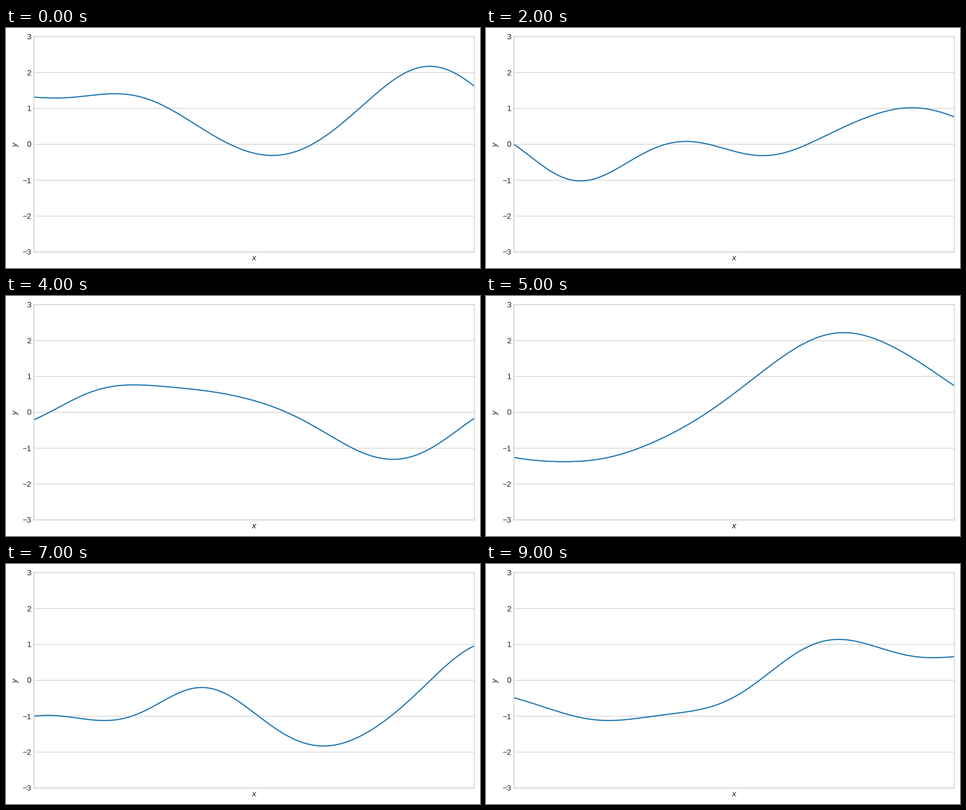
A matplotlib script for the animation above (10000 ms loop, 1053 by 532 pixels).

```python
import numpy as np
import matplotlib.pyplot as plt
from matplotlib.animation import FuncAnimation

WIDTH, HEIGHT, DPI = 1053, 532, 125
LEFT, RIGHT, TOP, BOTTOM = 62, 1040.5, 19.2, 496.5
SPAN = 8  # x range measured in kernel length scales
JITTER = 2e-5


def gaussian(a, b):
    """Return pairwise differences and the exponentiated quadratic kernel."""
    diff = a[:, None] - b[None, :]
    return diff, np.exp(-0.5 * diff ** 2)


def smooth_function(start, end, turns, through=()):
    """Gaussian process mean with flat slope at turns, passing through points."""
    points = np.array([(0, start), *through, *turns, (SPAN, end)])
    px, py = points.T
    flat = np.array([x for x, _ in turns])

    _, k_pp = gaussian(px, px)
    d_pf, k_pf = gaussian(px, flat)
    d_ff, k_ff = gaussian(flat, flat)
    cross = d_pf * k_pf
    cov = np.block([[k_pp, cross], [cross.T, (1 - d_ff ** 2) * k_ff]])
    known = np.concatenate([py, np.zeros(len(flat))])
    weights = np.linalg.solve(cov + JITTER * np.eye(len(known)), known)

    def mean(x):
        _, k_xp = gaussian(x, px)
        d_xf, k_xf = gaussian(x, flat)
        return np.hstack([k_xp, d_xf * k_xf]) @ weights

    return mean


FUNCTIONS = [
    smooth_function(1.315, 1.62, [(.39, 1.29), (1.47, 1.41), (4.33, -.31), (7.19, 2.175)],
                    [(2.45, 1), (3.56, 0), (5.91, 1)]),
    smooth_function(-1.545, 1, [(2.845, 2.35), (5.5, -.07), (7.73, 1.025)],
                    [(.79, 0), (1.31, 1), (4.27, 1)]),
    smooth_function(0, .765, [(1.21, -1.02), (3.13, .08), (4.52, -.315), (7.23, 1.02)],
                    [(5.33, 0)]),
    smooth_function(.6, .2, [(1.2, 1.235), (5.2, -1.28)], [(3.2, 0)]),
    smooth_function(-.205, -.165, [(1.82, .765), (6.52, -1.31)],
                    [(.28, 0), (3.09, .605), (4.59, 0), (5.79, -1), (7.21, -1)]),
    smooth_function(-1.255, .74, [(.92, -1.375), (5.99, 2.22)],
                    [(2.27, -1), (3.52, 0), (4.4, 1), (7.75, 1)]),
    smooth_function(.4, .6, [(1, .75), (4.3, -.6)]),
    smooth_function(-1, .96, [(.25, -.975), (1.28, -1.12), (3.05, -.2), (5.26, -1.83)],
                    [(4.08, -1), (6.48, -1), (7.2, 0)]),
    smooth_function(-.3, -.2, [(3, 1.06), (6.3, -.4)]),
    smooth_function(-.485, .66, [(1.725, -1.12), (5.9, 1.14), (7.61, .63)],
                    [(2.53, -1), (3.58, -.735), (4.46, 0)]),
]

plt.rcParams.update({
    "font.family": "Liberation Sans",
    "font.size": 10,
    "text.color": ".15",
    "text.hinting": "none",
    "mathtext.fontset": "dejavusans",
    "path.snap": False,
})
fig = plt.figure(figsize=(WIDTH / DPI, HEIGHT / DPI), dpi=DPI, facecolor="white")
ax = fig.add_axes([LEFT / WIDTH, 1 - BOTTOM / HEIGHT,
                   (RIGHT - LEFT) / WIDTH, (BOTTOM - TOP) / HEIGHT])
ax.set(xlim=(0, SPAN), ylim=(-3, 3), xticks=[], yticks=range(-3, 4))
ax.set_axisbelow(True)
ax.grid(axis="y", color=".8", linewidth=0.8)
ax.tick_params(length=0, pad=3.5, labelcolor=".15")
for spine in ax.spines.values():
    spine.set(color=".8", linewidth=1)


def label(px, py, text, rotation=0):
    fig.text(px / WIDTH, 1 - py / HEIGHT, text, ha="center", va="center",
             rotation=rotation)


label(551, 511, "$x$")
label(21.4, 258, "$y$", 90)

x = np.linspace(0, SPAN, 400)
line, = ax.plot([], [], color="#1f77b4", linewidth=1.5)


def update(frame):
    line.set_data(x, FUNCTIONS[frame](x))
    return line,


anim = FuncAnimation(fig, update, frames=len(FUNCTIONS), interval=1000,
                     repeat=True, repeat_delay=0)
plt.show()
```
